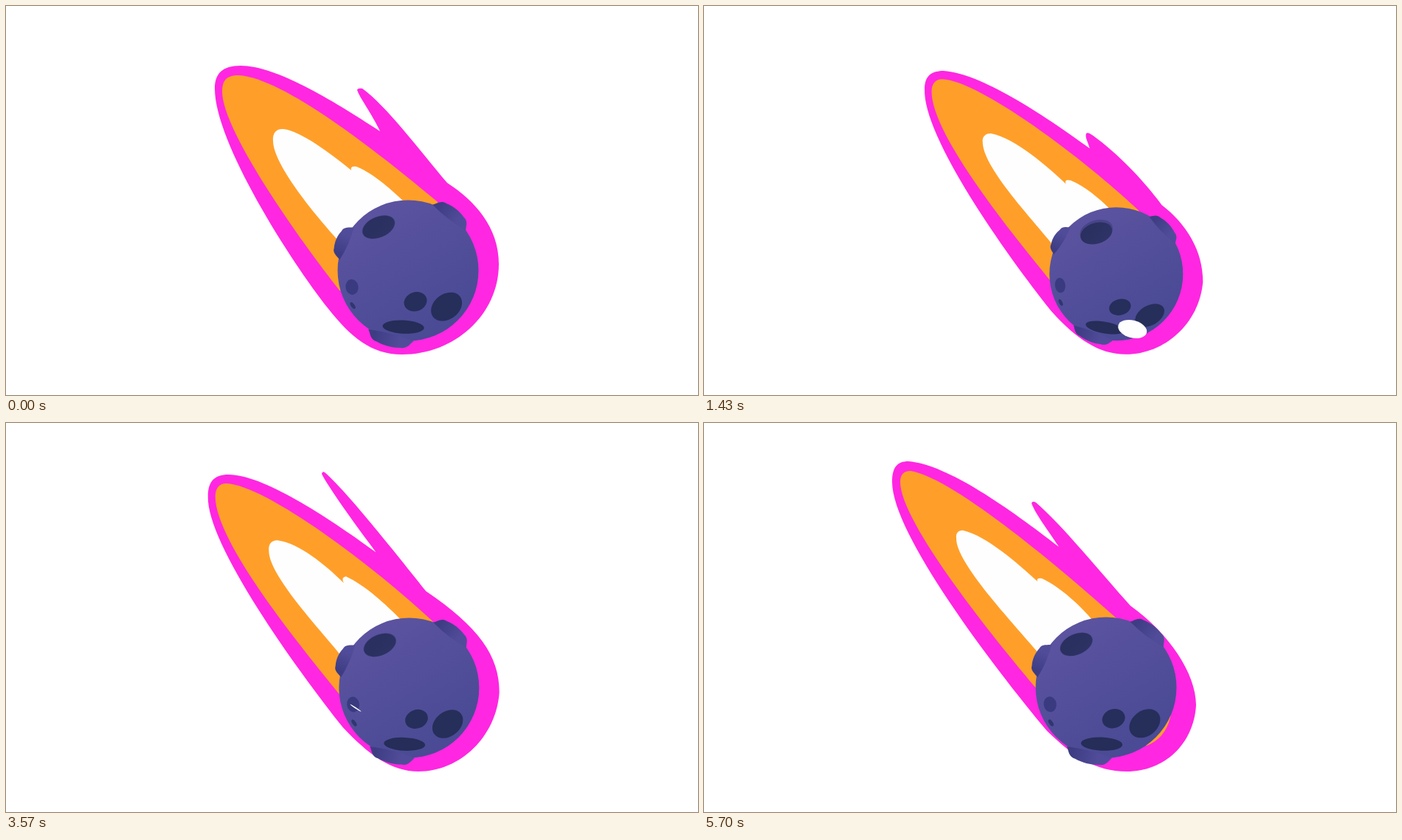
Animation of 938x528 px, one loop 5730 ms. Source, as an HTML page with a canvas:

```html
<!DOCTYPE html>
<html lang="en">
<head>
<meta charset="utf-8">
<title>Comet</title>
<style>
  html, body { margin: 0; width: 100%; height: 100%; overflow: hidden; background: #fff; }
  canvas { display: block; }
</style>
</head>
<body>
<canvas id="stage" width="938" height="528"></canvas>
<script>
const ctx = document.getElementById('stage').getContext('2d');
const LOOP = 5730, BEAT = LOOP / 3, HOLD = 40;
const PIVOT = { x: 809, y: 450 };
const MOON = { x: 545, y: 359, r: 95.5 };
const PINK = '#ff27e1', ORANGE = '#ff9f29', WHITE = '#fefefe';
const RAD = Math.PI / 180;

const clamp = v => Math.min(1, Math.max(0, v));
const mix = (a, b, k) => a + (b - a) * k;

// Flame poses, flipped through in order.
const wideOrange = 'M281,98 C281,86 287,80 296,80 C350,82 500,195 577,268 L600,330 L550,420 L452,370 C400,306 281,161 281,98Z';
const poses = [
  {
    pink: 'M283,112 C283,92 293,81 318,81 C365,81 440,126 507,170 C497,148 479,124 476,114 Q477,111 483,112 ' +
      'C515,135 560,195 598,240 C635,264 668,300 668,350 C668,420 607,473 537,473 C495,473 467,449 437,411 C385,345 283,185 283,112Z',
    orange: 'M293,116 C293,100 300,94 315,94 C375,97 500,195 585,266 L600,330 L550,420 L452,386 C400,320 293,170 293,116Z',
    white: 'M362,183 C361,172 367,166 376,167 C400,170 440,200 468,223 Q466,217 475,218 C500,228 525,252 540,266 ' +
      'L520,340 L452,320 C420,285 362,215 362,183Z'
  },
  {
    pink: 'M271,98 C271,77 280,68 299,68 C345,68 430,123 500,174 C470,134 433,82 426,67 Q427,63 430,65 ' +
      'C455,86 515,160 568,227 C640,276 668,315 668,365 C664,425 615,473 558,473 C520,473 490,450 455,413 C392,334 269,163 271,98Z',
    orange: wideOrange,
    white: 'M354,172 C353,162 359,157 367,158 C395,162 430,190 456,216 Q452,208 459,207 C485,219 512,244 535,267 ' +
      'L525,340 L455,318 C420,275 354,205 354,172Z'
  },
  {
    pink: 'M255,80 C255,60 262,52 277,52 C330,56 415,117 481,168 C466,145 449,123 444,109 Q445,105 450,108 ' +
      'C485,138 535,200 578,248 C630,285 667,340 667,383 C664,435 625,473 573,473 C530,473 500,452 465,418 C390,328 255,150 255,80Z',
    orange: 'M266,80 C266,70 271,65 280,65 C340,75 490,203 558,264 C610,310 640,370 632,400 Q625,428 600,438 ' +
      'L540,420 L452,362 C395,295 266,135 266,80Z',
    white: 'M342,157 C341,148 346,145 352,146 C382,153 425,190 452,215 Q450,210 458,211 C485,224 510,248 527,268 ' +
      'L520,340 L454,313 C415,267 342,190 342,157Z'
  },
  {
    pink: 'M271,94 C271,77 279,68 298,68 C350,71 440,130 507,179 C505,171 500,163 502,158 Q504,155 512,161 ' +
      'C545,185 582,222 610,260 C645,287 669,325 669,370 C664,430 614,474 559,474 C520,474 488,452 452,412 C386,329 268,162 271,94Z',
    orange: wideOrange,
    white: 'M354,170 C353,162 359,157 367,158 C400,165 445,203 473,230 Q470,223 480,225 C500,233 520,250 537,267 ' +
      'L525,340 L455,318 C420,275 354,205 354,170Z'
  }
].map(p => ({ pink: new Path2D(p.pink), orange: new Path2D(p.orange), white: new Path2D(p.white) }));

// Each end: angle, distance, half width, half height, tilt.
const craters = [
  { from: [163, .83, .09, .11, -10], to: [186.5, .885, .065, .115, 0], fill: '#393a7f' },
  { from: [147, .93, .026, .055, -35], to: [171.5, .94, .024, .05, 0], fill: '#30366f' },
  { from: [76, .455, .165, .135, -20], to: [108, .547, .165, .105, 3], fill: '#262e5b' },
  { from: [42.5, .75, .24, .18, -38], to: [79, .85, .235, .115, -3], fill: '#262e5a' },
  { from: [94, .805, .295, .095, 2], to: [129, .84, .28, .08, 37], fill: '#252d58' }
];
const bowl = { from: [235, .745, .24, .145, -24], to: [273, .61, .25, .168, 5] };

// Rims on the edge: angle at both ends, half width, height, dark side.
const rims = [
  { from: 203, to: 239, width: .22, top: 1.105, dark: -1 },
  { from: -53, to: -13, width: .26, top: 1.1, dark: -1 },
  { from: 104, to: 135, width: .29, top: 1.105, dark: 1 }
];
const LOW_TOP = 1.055;

// Sparks: birth in ms, lane from -1 (left) to 1 (right).
const sparks = [[410, 0], [543, .5], [900, -.6], [1305, -1], [1800, .4], [2220, -.3], [2650, 1],
  [3290, -1], [3850, .6], [4240, 0], [4670, 1], [4912, 0], [5215, 0]];
const SPARK_LIFE = 500;

function sway(t, lead, power) {
  const p = ((t + lead) % BEAT) / BEAT * 2;
  const x = p < 1 ? p : 2 - p;
  return x < .5 ? .5 * (2 * x) ** power : 1 - .5 * (2 - 2 * x) ** power;
}

function linear(x0, y0, x1, y1, a, b) {
  const g = ctx.createLinearGradient(x0, y0, x1, y1);
  g.addColorStop(0, a);
  g.addColorStop(1, b);
  return g;
}

function oval(x, y, a, b, tilt, fill) {
  ctx.fillStyle = fill;
  ctx.beginPath();
  ctx.ellipse(x, y, a, b, tilt, 0, Math.PI * 2);
  ctx.fill();
}

function drawRim({ from, to, width, top, dark }, turn, nod) {
  const w = width * mix(1, .88, nod), h = mix(top, LOW_TOP, nod);
  ctx.save();
  ctx.rotate(mix(from, to, turn) * RAD);
  ctx.fillStyle = linear(0, w * dark * .8, 0, -w * dark * .5, '#3e3d84', '#514c99');
  ctx.beginPath();
  ctx.moveTo(.95, -w * 1.15);
  ctx.bezierCurveTo(1, -w, h - .02, -w * .95, h - .015, -w * .6);
  ctx.bezierCurveTo(h + .015, -w * .2, h + .015, w * .2, h - .015, w * .6);
  ctx.bezierCurveTo(h - .02, w * .95, 1, w, .95, w * 1.15);
  ctx.quadraticCurveTo(.91, 0, .95, -w * 1.15);
  ctx.fill();
  ctx.restore();
}

function drawCrater({ from, to }, turn, nod, fill, lift = 0, grow = 1) {
  const [, dist, a, b] = from.map((v, i) => mix(v, to[i], nod));
  const angle = mix(from[0], to[0], turn) * RAD, tilt = mix(from[4], to[4], turn) * RAD;
  oval(Math.cos(angle) * dist, Math.sin(angle) * dist - lift, a * grow, b * grow, tilt, fill);
}

// turn rolls the ball in the picture plane, nod tips it towards the viewer.
function drawMoon(turn, nod) {
  ctx.save();
  ctx.translate(MOON.x, MOON.y);
  ctx.scale(MOON.r, MOON.r);
  oval(0, 0, 1, 1, 0, linear(-.5, -.8, .45, .75, '#5b539f', '#4a4a95'));
  rims.forEach(r => drawRim(r, turn, nod));
  drawCrater(bowl, turn, nod, '#484489', .07 * nod, 1.03);
  drawCrater(bowl, turn, nod, linear(-.3, -.8, .1, -.45, '#2a305f', '#31366c'));
  craters.forEach(c => drawCrater(c, turn, nod, c.fill));
  ctx.restore();
}

function drawSpark(t, [birth, lane]) {
  const u = (t - birth) / SPARK_LIFE;
  if (u < 0 || u > 1) return;
  const sx = 647, sy = 440;
  const cx = 560 + 57 * lane + 31 * lane * lane, cy = 375 - 65 * lane + 33 * lane * lane;
  const ex = 345 + 70 * lane, ey = 170 - 50 * lane;
  const v = 1 - u;
  const at = (s, c, e) => v * v * s + 2 * u * v * c + u * u * e;
  const slope = (s, c, e) => v * (c - s) + u * (e - c);
  const swell = Math.sqrt(clamp(u / .22)), thin = clamp((u - .25) / .2);
  oval(at(sx, cx, ex), at(sy, cy, ey), mix(20, 9, thin) * swell, mix(12, .8, thin) * swell,
    Math.atan2(slope(sy, cy, ey), slope(sx, cx, ex)), WHITE);
}

function draw(t) {
  ctx.fillStyle = '#fff';
  ctx.fillRect(0, 0, 938, 528);
  const nod = sway(t, 5, 3.5), turn = sway(t, 130, 2.4);
  const size = 1 - .107 * nod;
  const flame = poses[Math.floor(t / HOLD) % poses.length];
  ctx.save();
  ctx.translate(PIVOT.x, PIVOT.y);
  ctx.scale(size, size);
  ctx.translate(-PIVOT.x, -PIVOT.y);
  for (const [part, color] of [['pink', PINK], ['orange', ORANGE], ['white', WHITE]]) {
    ctx.fillStyle = color;
    ctx.fill(flame[part]);
  }
  drawMoon(turn, nod);
  ctx.restore();
  sparks.forEach(s => drawSpark(t, s));
}

const start = performance.now();
function tick() {
  draw((performance.now() - start) % LOOP);
  requestAnimationFrame(tick);
}
tick();
</script>
</body>
</html>
```
